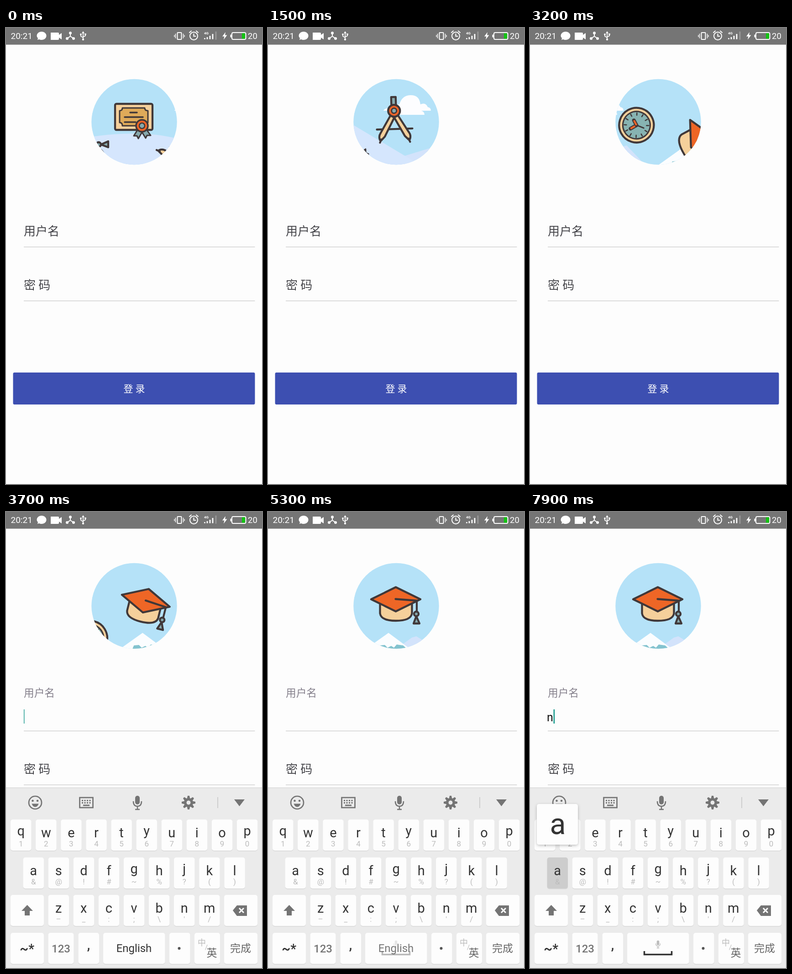
An HTML page for the animation above (8 s loop, 561x998 px).

```html
<!DOCTYPE html>
<html lang="zh">
<head>
<meta charset="utf-8">
<style>
html, body { margin: 0; width: 100%; height: 100%; overflow: hidden; background: #fdfdfd; }
svg { display: block; width: 561px; height: 998px; }
text { font-family: Roboto, "Noto Sans CJK SC", "Noto Sans CJK", sans-serif; }
.cjk { font-weight: 300; }
.mid { text-anchor: middle; }
.ink { stroke: #403839; stroke-width: 4.300; stroke-linejoin: round; stroke-linecap: round; }
</style>
</head>
<body>
<svg viewBox="0 0 561 998">
  <defs>
    <clipPath id="disc"><circle cx="281" cy="205.5" r="93.7"/></clipPath>
    <filter id="shade" x="-20%" y="-20%" width="140%" height="150%">
      <feDropShadow dx="0" dy="2" stdDeviation="3" flood-opacity=".25"/>
    </filter>
  </defs>
  <rect width="561" height="998" fill="#fdfdfd"/>

  <g fill="#fff" stroke-linecap="round">
    <rect width="561" height="36.5" fill="#757575"/>
    <text x="10.5" y="24" font-size="19">20:21</text>
    <path d="M78 8c6 0 10.500 4 10.500 9s-4.500 9-10.500 9c-2 0-4-.4-5.500-1.300L69 26l1-4c-2-2-2.500-3-2.500-5 0-5 4.500-9 10.500-9z"/>
    <path d="M98 10h16q2 0 2 2v3l6-4v14l-6-4v3q0 2-2 2H98z"/>
    <g stroke="#fff" stroke-width="2" fill="none">
      <path d="M141 11v7l-7 5M141 18l7 5"/>
      <path d="M169 11v14M164 14v4l5 3M174 14v3l-5 3" stroke-width="1.700"/>
      <rect x="375.500" y="10" width="9" height="15" rx="1"/>
      <path d="M371.500 13v9M388.500 13v9M369 16v3M391 16v3" stroke-width="1.500"/>
      <circle cx="411.500" cy="17.500" r="8.500"/>
      <path d="M411.500 13v5h4M402 10l4-3.500M421 10l-4-3.500"/>
      <path d="M435.500 22v2.500M441 20v4.500M447 17v7.500M453 13v11.500" stroke-width="2.800" stroke-linecap="butt"/>
      <path d="M460 9v15.500" stroke="#999" stroke-width="2.800"/>
      <rect x="495" y="10" width="30.500" height="15" rx="3"/>
    </g>
    <circle cx="141" cy="11" r="3"/><circle cx="134" cy="23" r="3"/><circle cx="148" cy="23" r="3"/>
    <path d="M169 7l3 4.500h-6z"/><circle cx="169" cy="25" r="2.200"/>
    <circle cx="164" cy="14" r="1.900"/><rect x="172.200" y="12" width="3.500" height="3.500"/>
    <text x="434" y="14" font-size="8" font-weight="700">4G</text>
    <path d="M481 9l-7 9.500h4.500l-1.500 7 7.500-10h-4.500z"/>
    <rect x="491.500" y="14.500" width="3" height="6"/>
    <rect x="517" y="11.500" width="7" height="12" fill="#13c413"/>
    <text x="530" y="24" font-size="18.500">20</text>
  </g>

  <g clip-path="url(#disc)">
    <rect x="187" y="111" width="188" height="190" fill="#b5e2f8"/>
    <path id="cloud" fill="#fdfdff" d="M-61 181Q-57 173-41 176Q-38 168-26 167Q-20 147-1 147Q18 147 20 167Q32 162 36 173Q43 174 43 181H22Q29 183 29 190H-39Q-38 184-32 181z"/>
    <path id="ridge" fill="#d3e3fb" d="M-150 303L0 257L50 310H-150z"/>
    <path id="farPeak" fill="#d3e3fb" d="M-50 304L-10 275L0 272L50 302V310H-50z"/>
    <g id="snowPeak">
      <path fill="#fbfdff" d="M-54 303L0 264.500L52 303z"/>
      <path fill="#83c3cf" d="M-24 304L-19 292L-8 291L-2 297L6 293L12 297L18 290L32 292L46 304z"/>
    </g>
    <path id="hill" fill="#d5e6fd" d="M150 244Q285 219 375 242L507 321V400H100V250z"/>
    <g id="wheel"></g>
  </g>

  <g fill="#45454a">
    <text id="userLabel" class="cjk" x="39">用户名</text>
    <text class="cjk" x="39" y="571.500" font-size="26">密 码</text>
    <text id="typed" x="37" y="457.500" font-size="25" fill="#111">n</text>
  </g>
  <rect id="caret" y="432" height="31" fill="#16998c"/>
  <path d="M39 479.200H545.500M39 597.300H545.500" stroke="#d2d2d2" stroke-width="1.500"/>
  <rect x="15.500" y="754" width="530" height="70" rx="3" fill="#3d4fb1"/>
  <text class="cjk mid" x="281" y="797" font-size="21" fill="#fff">登 录</text>
  <g id="keyboard"></g>
</svg>
<script>
const $ = id => document.getElementById(id);
const LOOP = 8;
const clamp = v => Math.max(0, Math.min(1, v));
const smooth = v => { v = clamp(v); return v * v * (3 - 2 * v); };
const move = (id, x, y = 0) => $(id).setAttribute('transform', `translate(${x} ${y})`);
const show = (id, on) => $(id).setAttribute('opacity', +on);

// Linear interpolation through [time, value] pairs
function track(t, keys) {
  const i = keys.findIndex(k => k[0] > t);
  if (i < 0) return keys[keys.length - 1][1];
  if (!i) return keys[0][1];
  const [t0, a] = keys[i - 1], [t1, b] = keys[i];
  return a + (b - a) * (t - t0) / (t1 - t0);
}

// Four objects, each drawn upright at the top of the wheel
const ticks = Array.from({ length: 12 }, (_, i) =>
  `<path d="M280 174v5" class="ink" style="stroke-width:2.500" transform="rotate(${i * 30} 280 201)"/>`).join('');
const leg = `
  <path d="M272 191L249 229Q244 236 247 244L250 245L258 237L280 196z" fill="#f5d09b" class="ink"/>
  <path d="M250 243L247 250" class="ink"/>`;
const objects = [
  `<rect x="239" y="166" width="82" height="57" rx="3" fill="#f5d09b" class="ink"/>
   <path d="M255 175H304Q304 181 311 181V207Q304 207 304 214H255Q255 207 249 207V181Q255 181 255 175z" fill="#dfaa59" class="ink" style="stroke-width:3"/>
   <path d="M272 185h15M260 195h40M260 206h24" class="ink" style="stroke-width:3.500"/>
   <path d="M289 222L280 236L287 236L290 242L298 228L306 241L309 235L317 235L307 221z" fill="#86a9ad" class="ink" style="stroke-width:3"/>
   <circle cx="298" cy="214" r="13" fill="#ed6428" class="ink" style="stroke-width:3.500"/>
   <circle cx="298" cy="214" r="6" fill="#86a9ad" class="ink" style="stroke-width:2.500"/>`,
  `<path d="M241 221H319" class="ink"/>
   ${leg}<g transform="matrix(-1 0 0 1 560 0)">${leg}</g>
   <rect x="274.500" y="151" width="10" height="20" fill="#86a9ad" class="ink"/>
   <circle cx="280" cy="181" r="13" fill="#ed6428" class="ink"/>
   <circle cx="280" cy="181" r="5.500" fill="#86a9ad" class="ink" style="stroke-width:3"/>`,
  `<circle cx="280" cy="201" r="38" fill="#f5d09b" class="ink"/>
   <circle cx="280" cy="201" r="30" fill="#87b3b2" class="ink" style="stroke-width:3"/>${ticks}
   <path d="M280 201L291 214" class="ink" style="stroke-width:3"/>
   <g id="longHand"><path d="M280 201V186" class="ink" style="stroke-width:8"/><path d="M280 201V186" stroke="#ed6428" stroke-width="4"/></g>
   <path d="M280 201V189" class="ink" style="stroke-width:8"/><path d="M280 201V189" stroke="#ed6428" stroke-width="4"/>`,
  `<path d="M245.500 199V222Q248 238 280 238Q313 238 315.500 222V199z" fill="#f5d09b" class="ink"/>
   <path d="M226 191L280 164.500L334 191L280 217.500z" fill="#ee6626" class="ink"/>
   <path d="M279.500 190.500L326 194V217" fill="none" class="ink"/>
   <path d="M325 228L319 244H332z" fill="#86a9ad" class="ink"/>
   <circle cx="325" cy="223" r="5" fill="#86a9ad" class="ink"/>`
];
$('wheel').innerHTML = objects.map((art, i) => `<g id="object${i}">${art}</g>`).join('');

// Keyboard
const esc = s => s.replace('&', '&amp;');
const label = (s, x, y, size, fill = '#333', extra = '') =>
  `<text class="mid" x="${x}" y="${y}" font-size="${size}" fill="${fill}" ${extra}>${esc(s)}</text>`;
const key = (x, y, w, id = '') =>
  `<rect x="${x}" y="${y + 1.5}" width="${w}" height="68" rx="5" fill="#d9d9d9"/>
   <rect ${id && `id="${id}"`} x="${x}" y="${y}" width="${w}" height="68" rx="5" fill="#fdfdfd"/>`;
// Letters with a descender sit higher on their key
const baseline = c => 'qypgj'.includes(c) ? 35 : 38.5;
const letterRow = (letters, marks, x0, y) => [...letters].map((c, i) => {
  const x = x0 + i * 55.1;
  return key(x, y, 45.5, 'key_' + c) + label(c, x + 22.7, y + baseline(c), 29) +
    label(marks[i], x + 22.7, y + 58.5, 17, '#bcbcbc');
}).join('');
const popup = (c, x, y) => `<g id="pop_${c}">
  <rect x="${x - 45}" y="${y}" width="90" height="89" rx="5" fill="#fdfdfd" filter="url(#shade)"/>
  ${label(c, x + 1, y + 66, 64)}</g>`;
const teeth = Array.from({ length: 8 }, (_, i) =>
  `<path d="M398 621h4l1.500 7h-7z" transform="rotate(${i * 45} 400 636)"/>`).join('');
const dots = Array.from({ length: 8 }, (_, i) =>
  `<rect x="${166 + i % 4 * 5.5}" y="${i < 4 ? 630 : 635}" width="3" height="3"/>`).join('');
const mic = `<rect x="-5" y="-15" width="10" height="19" rx="5"/>
  <path d="M-9-3Q-9 8 0 8T9-3M0 8V15M-5 15H5" fill="none" stroke="currentColor" stroke-width="2.500"/>`;

$('keyboard').innerHTML = `
  <rect y="603" width="561" height="395" fill="#ebebeb"/>
  <path d="M0 603.500H561" stroke="#d0d0d0"/>
  <g fill="#747474" color="#747474">
    <circle cx="64" cy="636" r="14" fill="none" stroke="#747474" stroke-width="2.700"/>
    <circle cx="58.500" cy="632" r="2.300"/><circle cx="69" cy="632" r="2.300"/>
    <path d="M56.500 638.500H71.500Q69 645.500 64 645.500T56.500 638.500z"/>
    <rect x="161.500" y="625" width="29" height="22" fill="none" stroke="#747474" stroke-width="2.700"/>
    ${dots}<rect x="169" y="640.500" width="14" height="3"/>
    <g transform="translate(288 636)">${mic}</g>
    ${teeth}<circle cx="400" cy="636" r="7.200" fill="none" stroke="#747474" stroke-width="5.500"/>
    <path d="M500 629H523L511.500 644z"/>
    <path d="M464 624V648" stroke="#c4c4c4" stroke-width="1.500"/>
  </g>
  ${letterRow('qwertyuiop', '1234567890', 10, 673)}
  ${letterRow('asdfghjkl', '&@!#~%?()', 37.5, 756)}
  ${key(10, 838, 73)}${letterRow('zxcvbnm', "–_:;\\'/", 92.5, 838)}${key(478, 838, 73)}
  <path d="M46.500 860L59 873H52V883H41V873H34z" fill="#747474"/>
  <path d="M497 872L506 861H528V884H506z" fill="#747474"/>
  <path d="M511 867L521 877M521 867L511 877" stroke="#fff" stroke-width="3"/>
  ${[[10, 73], [92.5, 56], [158.500, 45.5], [213, 135.500], [358, 45.5], [413, 56], [478, 73]].map(k => key(k[0], 921, k[1])).join('')}
  ${label('~*', 46, 966, 29, '#333', 'font-weight="500"')}
  ${label('123', 120.5, 964, 24, '#747474', 'font-weight="500"')}
  ${label(',', 181, 957, 29, '#333', 'font-weight="500"')}
  <circle cx="379.500" cy="955" r="3" fill="#555"/>
  ${label('中', 429, 949, 18, '#bcbcbc')}${label('/', 439, 958, 15, '#bcbcbc')}
  ${label('英', 451, 973, 23, '#666')}${label('完成', 514, 963, 23, '#666')}
  <g id="language">${label('English', 280.5, 963, 24)}</g>
  <g id="spaceBar">
    <g transform="translate(280.500 946) scale(.55)" fill="#bcbcbc" color="#bcbcbc">${mic}</g>
    <path d="M250.500 961V968.500H310.500V961" fill="none" stroke="#333" stroke-width="3.500"/>
  </g>
  ${popup('n', 391, 721)}${popup('a', 60, 639)}`;

const FOCUS = 3.35, TYPED = 7.5;
const presses = { n: [7.3, 7.5], a: [7.75, 8] };
const TURN_START = 0.07, TURN = 1.32;

function draw(t) {
  let angle = 0;
  for (let i = 0; i < 3; i++) angle += 90 * smooth((t - TURN_START - i * TURN) / TURN);
  objects.forEach((_, i) => $('object' + i).setAttribute('transform', `rotate(${i * 90 - angle} 280 300)`));
  show('object0', angle < 180);
  $('longHand').setAttribute('transform', `rotate(${track(t, [[2.4, -112], [3.2, -92]])} 280 201)`);

  move('cloud', track(t, [[0, 430], [1.5, 314], [2.4, 226], [3.2, 162], [4, 100]]));
  move('ridge', track(t, [[0, 510], [1.5, 374], [2.4, 285], [3.2, 212], [4.2, 120]]));
  move('snowPeak', track(t, [[2.4, 430], [3.2, 331], [4.1, 274], [4.4, 270], [5, 264]]));
  move('farPeak', track(t, [[2.4, 500], [3.2, 410], [4.1, 331], [4.4, 328], [5, 325]]));
  move('hill', track(t, [[0, 0], [1.5, -188], [2.4, -350]]), track(t, [[0, 0], [1.5, -30], [2.4, 0]]));

  const float = smooth((t - FOCUS) / 0.2);
  const user = $('userLabel');
  user.setAttribute('y', 454 - 50.5 * float);
  user.setAttribute('font-size', 26 - 3.3 * float);
  user.setAttribute('fill', `rgb(${69 + 64 * float},${69 + 59 * float},${74 + 66 * float})`);

  const typed = t >= TYPED;
  show('typed', typed);
  $('caret').setAttribute('x', typed ? 51.5 : 39);
  $('caret').setAttribute('width', typed ? 2.6 : 1.4);
  show('caret', t >= FOCUS && (t - (typed ? TYPED : FOCUS)) % 1 < 0.5);

  move('keyboard', 0, 396 * (1 - smooth((t - FOCUS - 0.05) / 0.25)));
  const fade = clamp((t - 5.2) / 0.3);
  show('language', 1 - fade);
  show('spaceBar', fade);
  for (const c in presses) {
    const down = t >= presses[c][0] && t < presses[c][1];
    show('pop_' + c, down);
    $('key_' + c).setAttribute('fill', down ? '#cdcdcd' : '#fdfdfd');
  }
}

const start = performance.now();
function tick() {
  draw((performance.now() - start) / 1000 % LOOP);
  requestAnimationFrame(tick);
}
tick();
</script>
</body>
</html>
```
